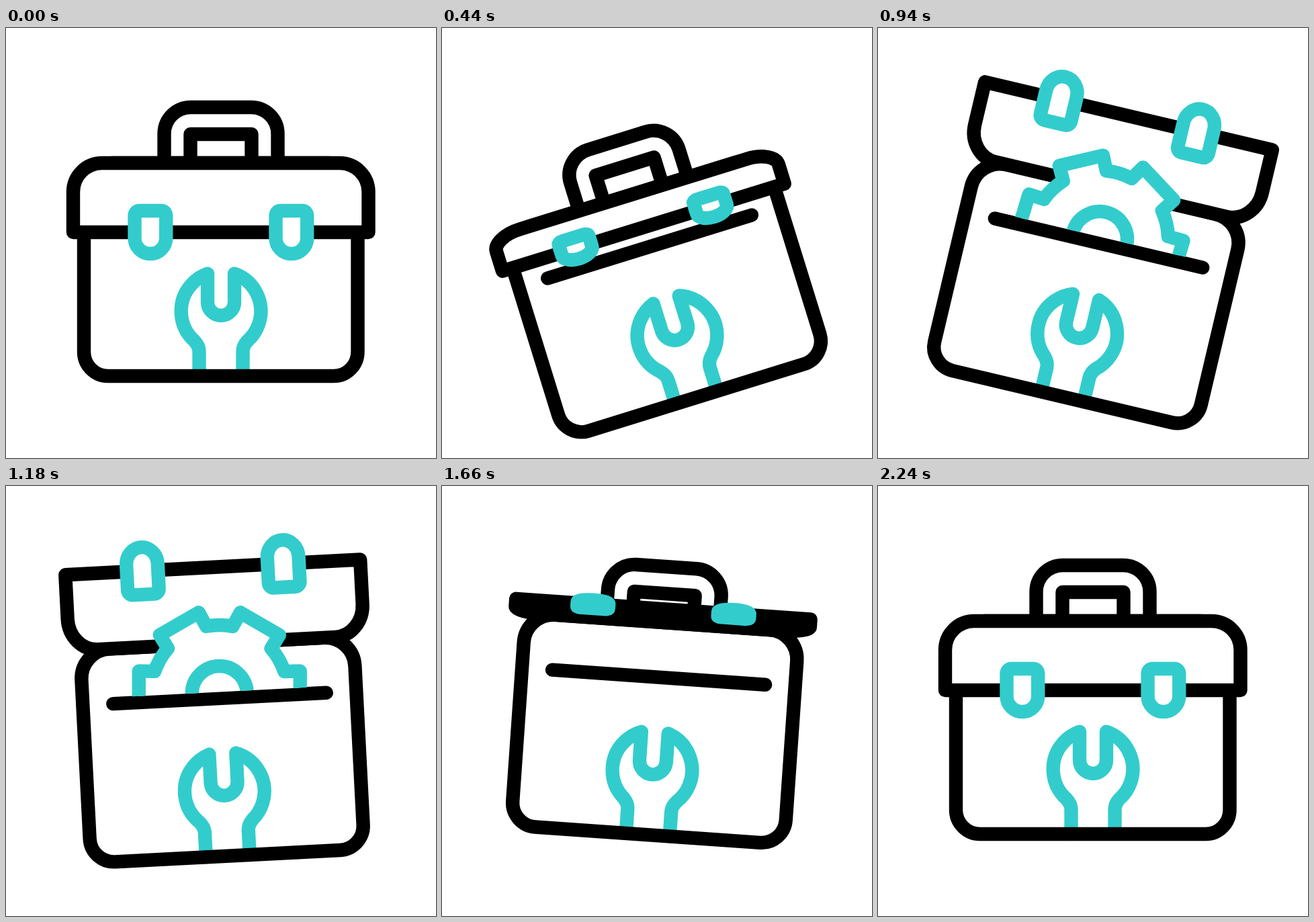
An HTML page with a canvas for the animation above (2.4 s loop, 640 by 640 pixels).

```html
<!DOCTYPE html>
<html lang="en">
<head>
<meta charset="utf-8">
<title>Toolbox</title>
<style>
  html, body { margin: 0; width: 100%; height: 100%; overflow: hidden; background: #fff; }
  canvas { display: block; width: 640px; height: 640px; }
</style>
</head>
<body>
<canvas id="stage" width="640" height="640"></canvas>
<script>
const c = document.getElementById('stage').getContext('2d');
const LOOP = 2400, BLACK = '#000', TEAL = '#33cccc', WHITE = '#fff';
const HINGE = 201, SLOT = 283, RAD = Math.PI / 180;

// Eased 0..1 progress between two times
function ease(t, from, to) {
  const u = Math.min(1, Math.max(0, (t - from) / (to - from)));
  return (1 - Math.cos(Math.PI * u)) / 2;
}

// Rises to 1 over the first pair of times, falls back over the second
const pulse = (t, up, top, down, end) => ease(t, up, top) - ease(t, down, end);

// Swings from rest through each [time, value] peak and back to rest
function swing(t, end, ...peaks) {
  let value = 0, last = 0, lastTime = 0;
  for (const [time, peak] of [...peaks, [end, 0]]) {
    value += (peak - last) * ease(t, lastTime, time);
    last = peak;
    lastTime = time;
  }
  return value;
}

const tilt = t => swing(t, 2080, [375, -18.5], [893, 14], [1315, -8], [1646, 4]);
const drop = t => swing(t, 2240, [356, 53], [710, -37], [1030, 52], [1470, -20.5], [1806, 16], [2080, -3]);
const flip = t => 1 - 2.1 * pulse(t, 186, 975, 1293, 2099);
const spin = t => 90 - 87 * pulse(t, 430, 965, 1270, 1830);

function paint(color, fill) {
  if (fill) { c.fillStyle = WHITE; c.fill(); }
  c.strokeStyle = color;
  c.stroke();
}

function handle() {
  c.beginPath();
  c.roundRect(235.5, 118, 169, 100, [39.5, 39.5, 0, 0]);
  paint(BLACK, true);
  c.beginPath();
  c.rect(274.5, 158, 91, 60);
  paint(BLACK);
}

function wrench() {
  c.beginPath();
  c.moveTo(287.5, 518);
  c.lineTo(287.5, 482);
  c.quadraticCurveTo(287.5, 473, 280.5, 466);
  c.arc(320, 421.5, 59.3, 131.5 * RAD, 250.3 * RAD);
  c.lineTo(300, 408);
  c.arc(320, 408, 20, Math.PI, 0, true);
  c.lineTo(340, 365.6);
  c.arc(320, 421.5, 59.3, -70.3 * RAD, 48.5 * RAD);
  c.quadraticCurveTo(352.5, 473, 352.5, 482);
  c.lineTo(352.5, 518);
  paint(TEAL);
}

function body() {
  const shell = () => {
    c.beginPath();
    c.roundRect(116, HINGE, 407.5, 317, [44, 44, 36, 36]);
  };
  shell();
  c.fillStyle = WHITE;
  c.fill();
  wrench();
  shell();
  paint(BLACK);
  c.beginPath();
  c.moveTo(161, SLOT);
  c.lineTo(479, SLOT);
  paint(BLACK);
}

// Only the outline is scaled, so the line weight stays constant
function flipped(scale, color, ...box) {
  c.save();
  c.translate(0, HINGE);
  c.scale(1, scale);
  c.beginPath();
  c.roundRect(...box);
  c.restore();
  paint(color, true);
}

function lid(scale) {
  flipped(scale, BLACK, 100, 0, 439.5, 103, [43, 43, 0, 0]);
  for (const x of [191.5, 401.5]) {
    flipped(scale, TEAL, x, 71, 46.7, 64, [7, 7, 23.3, 23.3]);
  }
}

// The gear climbs out of the slot as it turns
function gear(angle) {
  const tip = Math.hypot(120, 33.5), half = Math.atan2(33.5, 120), root = Math.asin(33 / 102);
  c.save();
  c.beginPath();
  c.rect(0, -200, 640, SLOT - 9.5 + 200);
  c.clip();
  c.translate(320, 270 + 2 * angle);
  c.rotate(angle * RAD);
  c.beginPath();
  for (let i = 0; i < 6; i++) {
    const a = i * 60 * RAD;
    c.lineTo(tip * Math.cos(a - half), tip * Math.sin(a - half));
    c.lineTo(tip * Math.cos(a + half), tip * Math.sin(a + half));
    c.arc(0, 0, 102, a + root, a + 60 * RAD - root);
  }
  c.closePath();
  paint(TEAL, true);
  c.beginPath();
  c.arc(0, 0, 41, 0, 2 * Math.PI);
  paint(TEAL);
  c.restore();
}

function draw(t) {
  c.fillStyle = WHITE;
  c.fillRect(0, 0, 640, 640);
  c.save();
  c.lineWidth = 20.4;
  c.lineJoin = c.lineCap = 'round';
  c.translate(320, 320 + drop(t));
  c.rotate(tilt(t) * RAD);
  c.translate(-320, -320);
  handle();
  body();
  lid(flip(t) || 0.001);
  gear(spin(t));
  c.restore();
}

const start = performance.now();
function tick() {
  draw((performance.now() - start) % LOOP);
  requestAnimationFrame(tick);
}
tick();
</script>
</body>
</html>
```
